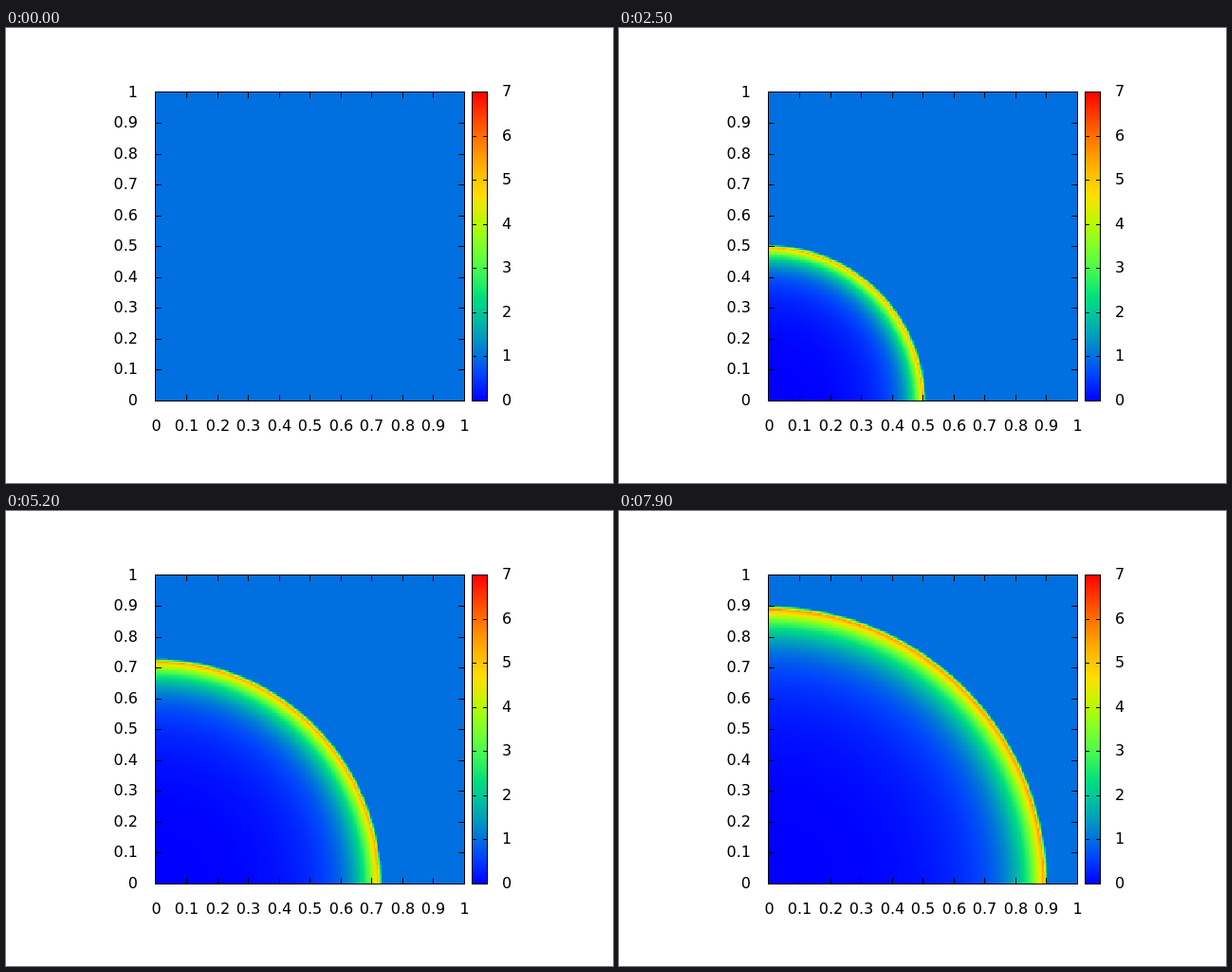
These frames come from a looping animation (640x480 px, 8 s). An HTML page with a canvas:

```html
<!DOCTYPE html>
<html lang="en">
<head>
<meta charset="utf-8">
<title>Blast wave density</title>
<style>
html, body { margin: 0; width: 100%; height: 100%; overflow: hidden; background: #fff; }
canvas { display: block; }
</style>
</head>
<body>
<canvas id="stage" width="640" height="480"></canvas>
<script>
const LOOP = 8000, STEP = 100;
const LEFT = 157, TOP = 67, SIZE = 326, BOTTOM = TOP + SIZE;
const BAR = 491, BAR_W = 16, MAX = 7;
const CELLS = 200, SAMPLES = 1500, SMEAR = 0.005;

const ctx = document.getElementById('stage').getContext('2d');
const grid = document.createElement('canvas');
grid.width = grid.height = CELLS;
const gridCtx = grid.getContext('2d');
const image = gridCtx.createImageData(CELLS, CELLS);

const byte = v => Math.round(255 * Math.min(1, Math.max(0, v)));

// Blue - green - yellow - red ramp for x in 0..1
function ramp(x) {
  return [byte(3 * x - 1), byte(Math.sin(Math.PI * x)), byte(1.16 - 2 * x)];
}

// Self-similar density behind a strong cylindrical shock
function density(r, front) {
  if (r >= front) return 1;
  const s = Math.abs(r) / front;
  return 6 * Math.pow(s, 5 + 9 * Math.pow(s, 3.5));
}

function smoothDensity(r, front) {
  let sum = 0;
  for (let k = -5; k <= 5; k++) sum += density(r + SMEAR * k / 5, front);
  return sum / 11;
}

function drawField(ms) {
  const front = ms ? 0.3195 * Math.sqrt(ms / 1000) - 0.003 : 0;
  const colors = [];
  for (let i = 0; i <= SAMPLES; i++) {
    const rho = front ? smoothDensity(i / 1000, front) : 1;
    colors.push(ramp(rho / MAX));
  }
  let p = 0;
  for (let j = 0; j < CELLS; j++) {
    const y = 1 - (j + 0.5) / CELLS + 0.002;
    for (let i = 0; i < CELLS; i++) {
      const x = (i + 0.5) / CELLS - 0.001;
      const c = colors[Math.min(SAMPLES, Math.round(1000 * Math.hypot(x, y)))];
      image.data[p++] = c[0];
      image.data[p++] = c[1];
      image.data[p++] = c[2];
      image.data[p++] = 255;
    }
  }
  gridCtx.putImageData(image, 0, 0);
  ctx.imageSmoothingEnabled = false;
  ctx.drawImage(grid, LEFT, TOP, SIZE + 1, SIZE + 1);
}

function drawBar() {
  for (let y = 0; y <= SIZE; y++) {
    ctx.fillStyle = `rgb(${ramp(1 - y / SIZE)})`;
    ctx.fillRect(BAR, TOP + y, BAR_W + 1, 1);
  }
}

function label(text, x, y, align) {
  ctx.textAlign = align;
  ctx.fillText(text, x, y);
}

function drawAxes() {
  ctx.fillStyle = ctx.strokeStyle = '#000';
  ctx.lineWidth = 1;
  ctx.font = '16px "DejaVu Sans", Verdana, sans-serif';
  ctx.textBaseline = 'alphabetic';
  ctx.strokeRect(LEFT + 0.5, TOP + 0.5, SIZE, SIZE);
  ctx.strokeRect(BAR + 0.5, TOP + 0.5, BAR_W, SIZE);

  for (let i = 0; i <= 10; i++) {
    const x = Math.round(157.7 + 32.5 * i), y = Math.round(392.7 - 32.5 * i);
    if (i % 10) {
      ctx.fillRect(x, TOP, 1, 7);
      ctx.fillRect(x, BOTTOM - 6, 1, 7);
      ctx.fillRect(LEFT, y, 7, 1);
      ctx.fillRect(LEFT + SIZE - 6, y, 7, 1);
    }
    const text = String(i / 10);
    label(text, x + 0.5, 425, 'center');
    label(text, 139, y + 5, 'right');
  }

  for (let i = 0; i <= MAX; i++) {
    const y = Math.round(BOTTOM - SIZE * i / MAX);
    ctx.fillRect(BAR, y, 5, 1);
    ctx.fillRect(BAR + BAR_W - 4, y, 5, 1);
    label(String(i), 523, y + 5, 'left');
  }
}

function draw(ms) {
  ctx.fillStyle = '#fff';
  ctx.fillRect(0, 0, 640, 480);
  drawField(ms);
  drawBar();
  drawAxes();
}

let shown = -1;
function tick() {
  const ms = Math.floor(performance.now() % LOOP / STEP) * STEP;
  if (ms !== shown) draw(shown = ms);
  requestAnimationFrame(tick);
}
tick();
</script>
</body>
</html>
```
